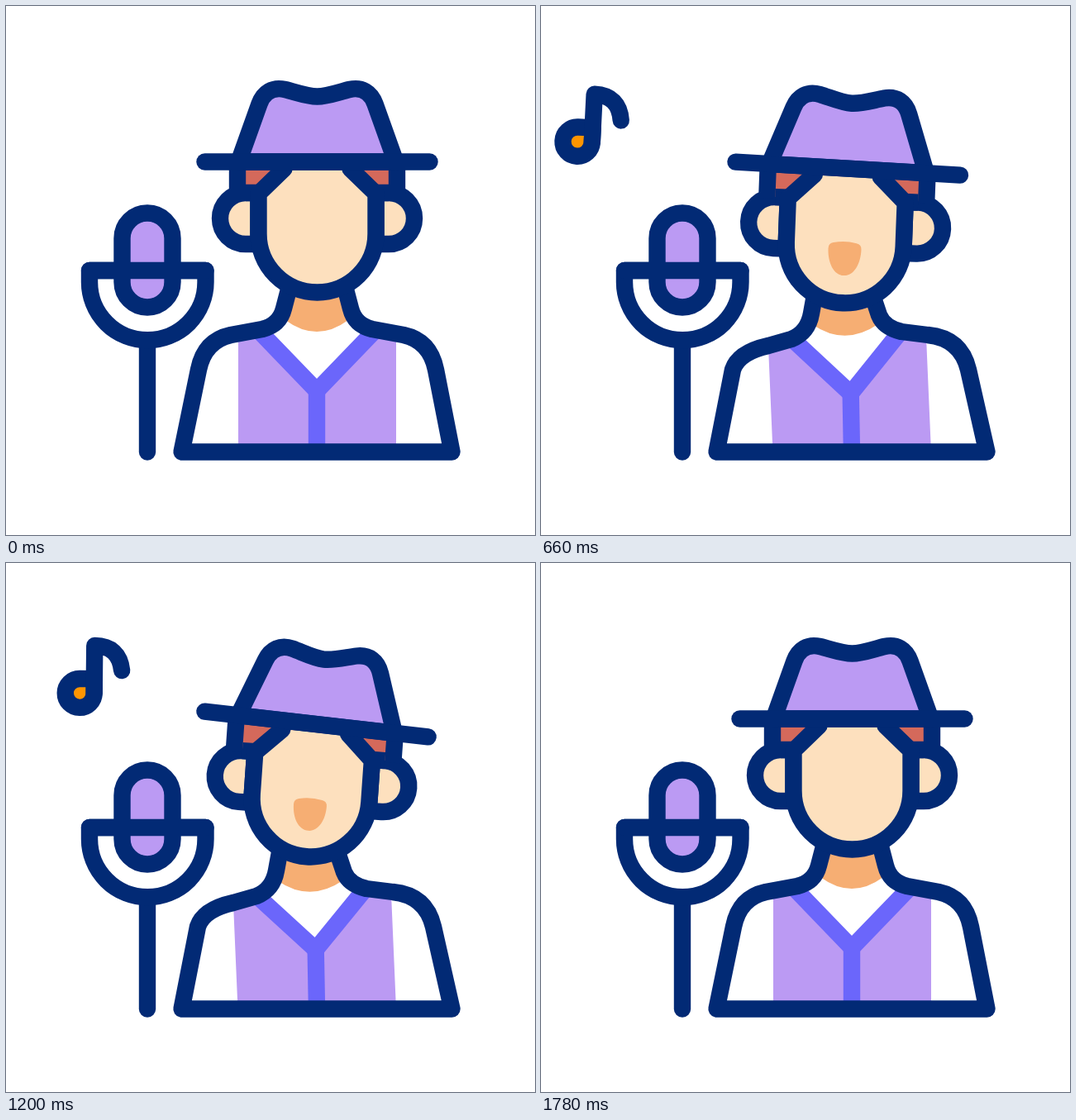
Write an HTML page with a canvas that moves like this. It is 640 by 640 pixels and loops after 2100 ms.

```html
<!DOCTYPE html>
<html lang="en">
<head>
<meta charset="utf-8">
<title>Singer</title>
<style>
  html, body { margin: 0; width: 100%; height: 100%; overflow: hidden; background: #fff; }
  canvas { display: block; }
</style>
</head>
<body>
<canvas id="stage" width="640" height="640"></canvas>
<script>
const ctx = document.getElementById('stage').getContext('2d');
const LOOP = 2100, LINE = 20.4;
const INK = '#022a75', PURPLE = '#bb9af3', LAPEL = '#6b66fb', SKIN = '#fde0be',
      SHADE = '#f6ae73', HAIR = '#d4695b', ORANGE = '#ff9500';

// Smooth curve through [time, ...values] keys, flat at turning points
function track(keys, t) {
  const last = keys.length - 1;
  if (t <= keys[0][0]) return keys[0].slice(1);
  if (t >= keys[last][0]) return keys[last].slice(1);
  const i = keys.findIndex(k => k[0] > t) - 1, a = keys[i], b = keys[i + 1];
  const span = b[0] - a[0], u = (t - a[0]) / span;
  const slope = (n, c) => {
    if (n === 0 || n === last) return 0;
    const [p, q, r] = [keys[n - 1], keys[n], keys[n + 1]];
    const s1 = (q[c] - p[c]) / (q[0] - p[0]), s2 = (r[c] - q[c]) / (r[0] - q[0]);
    return s1 * s2 > 0 ? 2 * s1 * s2 / (s1 + s2) : 0;
  };
  return a.slice(1).map((v, n) => {
    const c = n + 1, w = u * u * (3 - 2 * u);
    return v + (b[c] - v) * w
      + span * u * (1 - u) * (slope(i, c) * (1 - u) - slope(i + 1, c) * u);
  });
}

// Blend two path strings with the same structure
function mix(from, to, k) {
  const goal = to.match(/-?[\d.]+/g);
  let i = 0;
  return from.replace(/-?[\d.]+/g, n => +n + (goal[i++] - n) * k);
}

const place = (x, y, angle = 0, sx = 1, sy = sx) =>
  new DOMMatrix().translate(x, y).rotate(angle).scale(sx, sy);

// The matrix moves the outline only, so line weight stays constant
function shape(d, { fill, stroke, width = LINE, cap = 'round', at = place(0, 0) }) {
  const path = new Path2D();
  path.addPath(new Path2D(d), at);
  if (fill) { ctx.fillStyle = fill; ctx.fill(path); }
  if (stroke) {
    ctx.strokeStyle = stroke;
    ctx.lineWidth = width;
    ctx.lineCap = cap;
    ctx.lineJoin = cap === 'butt' ? 'miter' : 'round';
    ctx.stroke(path);
  }
}

const POSE = [[200, 0], [420, 1], [1440, 1], [1780, 0]];
// time, angle, x, y
const HEAD = [[200, 0, 376.5, 257], [500, -3.8, 364, 267], [735, 4, 370, 264],
  [820, .8, 367, 261.3], [970, -3.8, 364, 259.7], [1020, -3, 364, 259.7],
  [1200, 4, 370, 264], [1420, -3.8, 364, 267], [1780, 0, 376.5, 257]];
const HAT = [[200, 0, 376.5, 188.5], [500, -6.9, 359, 198.7], [735, 6.5, 375, 195],
  [820, 3.15, 368.5, 192], [970, -6.5, 359.5, 190.5], [1020, -5.7, 360.5, 190.5],
  [1200, 6.5, 375.5, 195], [1420, -6.1, 359.5, 198.5], [1780, 0, 376.5, 188.5]];
// time, jaw drop, mouth width, mouth height
const MOUTH = [[200, 0, 0, 0], [440, 2, 0, 0], [500, 2, .6, .28], [620, 5, 1, 1.05],
  [820, .8, 1, .95], [1020, 7, 1.07, 1.15], [1200, 2, 1, 1],
  [1420, 8, 1.07, 1.15], [1640, 1, 0, 0], [1780, 0, 0, 0]];

const NOTE_Y = [[0, 305], [160, 228], [335, 138], [480, 76], [555, 50], [620, 42]];
const NOTES = [
  { start: 340, x: [[0, 165], [160, 85.5], [340, 61], [390, 60], [480, 79.5], [620, 95]] },
  { start: 865, x: [[0, 165], [157, 87.5], [335, 106], [415, 104], [555, 101], [620, 100]] }
];

function drawNote({ start, x }, t) {
  const u = t - start;
  if (u <= 0 || u >= 620) return;
  const grow = Math.min(1, u / 100, (620 - u) / 60);
  const size = grow * (1.115 - .00072 * u);
  const at = place(track(x, u)[0], track(NOTE_Y, u)[0], 51 - .15 * u, size).translate(-19, 23);
  const pen = { stroke: INK, width: LINE * grow, at };
  shape('M20 -20H0A20 20 0 1 0 20 0Z', { ...pen, fill: ORANGE });
  shape('M20 0V-66Q54 -66 58 -32', pen);
}

function drawMic() {
  const pen = { stroke: INK };
  shape('M171 404V539.5', pen);
  shape('M101 320H241.5V334A70.2 70.2 0 0 1 101 334Z', { ...pen, fill: '#fff' });
  shape('M140.5 281A30.5 30.5 0 0 1 201.5 281V334A30.5 30.5 0 0 1 140.5 334Z',
    { ...pen, fill: PURPLE });
  shape('M101 320H241.5', pen);
}

function drawBody(pose, bounce) {
  const v = 465 + 5 * bounce, dip = 5 * bounce;
  shape(mix('M342 340L338 380Q376 408 414 380L411 340Z',
    `M331 345L329 ${382 + dip}Q368 ${408.5 + dip} 408 ${381 + dip}L402 345Z`, pose), { fill: SHADE });
  shape(mix('M281 540L281 402L306 393L376 465L447 393L472 402L472 540Z',
    `M280.5 540L275 412L303 402L374.7 ${v}L436 394L466 400L472 540Z`, pose), { fill: PURPLE });
  const lapel = { stroke: LAPEL, cap: 'butt' };
  shape(mix('M307 394L376 465.5L445 394', `M304 403L374.7 ${v}L434 395`, pose), lapel);
  shape(mix('M376 465L376 540', `M374.7 ${v}L376 540`, pose), lapel);
  shape(mix(
    'M342 343L336 366Q331 386 310 391L272 398Q240 405 233 440L212.5 539.5L539.5 539.5' +
    'L520 440Q513 405 481 398L443 391Q422 386 417 366L411 343',
    'M331 350L327 372Q323 395 303 403L275 411Q239 419 232 440L212.5 539.5L539.5 539.5' +
    'L517 440Q508 402 468 398L436 394Q415 389 409 374L401 350', pose), { stroke: INK });
}

function drawHead(t) {
  const [angle, x, y] = track(HEAD, t), [jaw, wide, tall] = track(MOUTH, t);
  const at = place(x, y, angle), ink = { stroke: INK, at, cap: 'butt' };
  for (const side of [-1, 1])
    shape('M71 -31H86.5A31 31 0 0 1 86.5 31H71Z',
      { fill: SKIN, stroke: INK, at: at.scale(side, 1) });
  shape('M-96 -68H96V-31H-96Z', { fill: HAIR, at });
  shape('M-96.5 -68V-29M96.5 -68V-29', ink);
  shape('M-71 -31H-86.5M71 -31H86.5', ink);
  const chin = 18.5 + jaw;
  shape(`M-40 -60L-71 -30V${chin}A71 71 0 0 0 71 ${chin}V-30L40 -60Z`, { fill: SKIN, at });
  shape(`M-40 -60L-71 -30V${chin}A71 71 0 0 0 71 ${chin}V-30L40 -60`, { stroke: INK, at });
  if (wide > 0 && tall > 0)
    shape('M-20 -11Q-20 -17 -14 -18Q0 -21 14 -18Q20 -17 20 -11C20 6 12 20 0 20C-12 20 -20 6 -20 -11Z',
      { fill: SHADE, at: at.translate(0, 40).scale(wide, tall) });
}

function drawHat(t) {
  const [angle, x, y] = track(HAT, t), at = place(x, y, angle);
  shape('M-95 0L-70 -70C-65 -84 -54 -91 -39 -87.5C-25 -84 -12 -79 0 -79' +
    'C12 -79 25 -84 39 -87.5C54 -91 65 -84 70 -70L95 0Z', { fill: PURPLE, stroke: INK, at });
  shape('M-136 0H136', { stroke: INK, at });
}

function frame() {
  const t = performance.now() % LOOP;
  const headY = track(HEAD, t)[2];
  ctx.fillStyle = '#fff';
  ctx.fillRect(0, 0, 640, 640);
  NOTES.forEach(note => drawNote(note, t));
  drawMic();
  drawBody(track(POSE, t)[0], Math.max(0, Math.min(1, (headY - 260.5) / 6.5)));
  drawHead(t);
  drawHat(t);
  requestAnimationFrame(frame);
}
frame();
</script>
</body>
</html>
```
